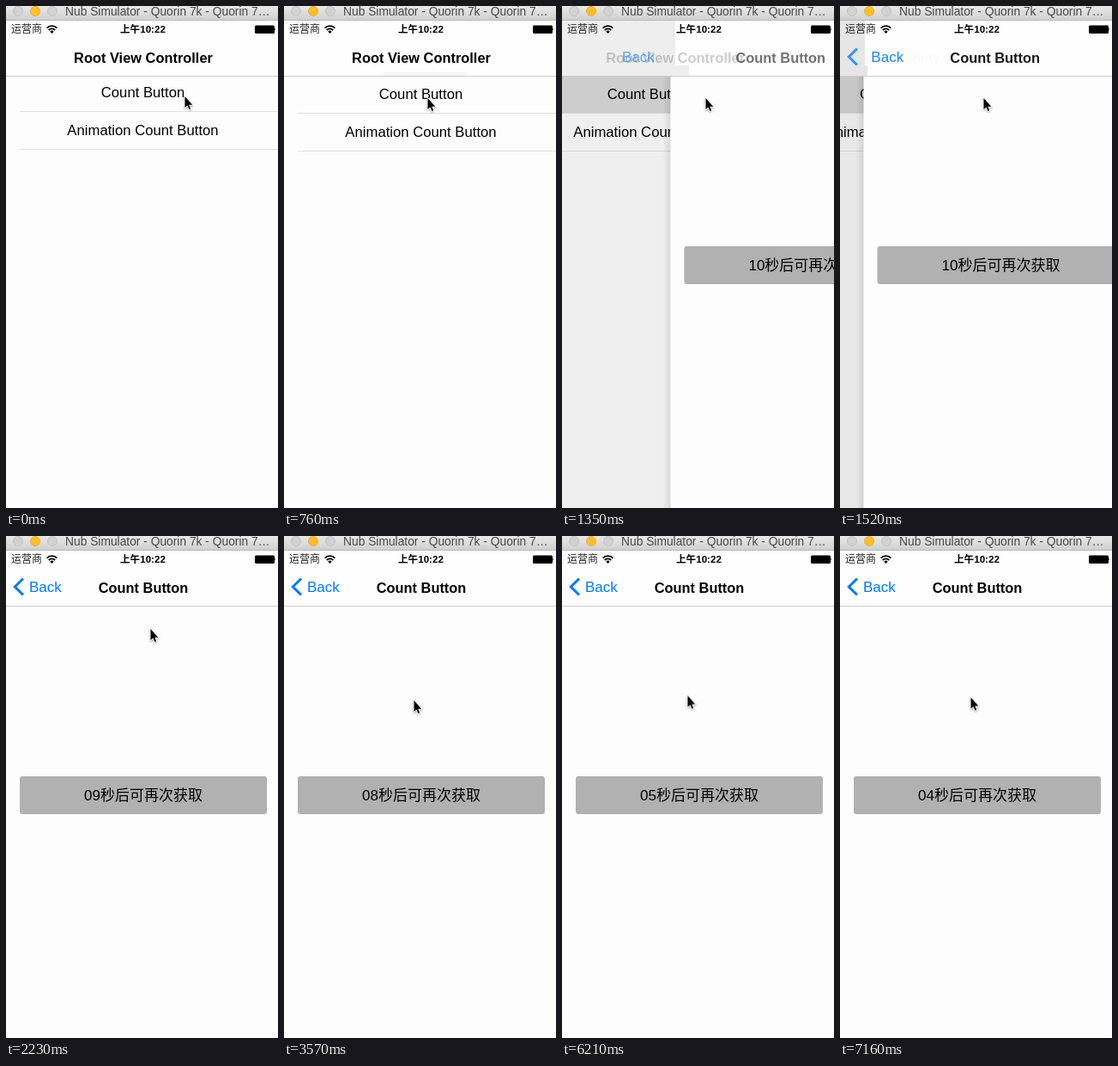
Write an HTML page that moves like this. It is 317 px wide and 583 px high and loops after 8 s.

```html
<!DOCTYPE html>
<html lang="zh">
<head>
<meta charset="utf-8">
<title>Count Button</title>
<style>
@property --p { syntax: "<number>"; inherits: true; initial-value: 0; }
@property --n { syntax: "<integer>"; inherits: true; initial-value: 10; }

html, body { margin: 0; width: 100%; height: 100%; overflow: hidden; background: #fdfdfd; }
body * { position: absolute; box-sizing: border-box; white-space: nowrap; }

/* --p is the progress of the push from the list to the detail page */
#stage {
  inset: 0; width: 317px; height: 583px; overflow: hidden; background: #fdfdfd; color: #000;
  font: 16.7px/20px "Liberation Sans", "Noto Sans CJK SC", "Noto Sans CJK", sans-serif;
  animation: push 8s step-end infinite;
}

.list { top: 0; left: 0; width: 320px; height: 583px; transform: translateX(calc(var(--p) * -96px)); }
.rows { top: 81px; left: 0; width: 320px; animation: settle 8s infinite; }
.row { left: 0; width: 319px; height: 44px; line-height: 43px; text-align: center; }
.row + .row { top: 44px; }
.row::after { content: ""; position: absolute; left: 16px; right: -100px; bottom: 0; height: 1px; background: #e1e1e3; }
.row span { left: 0; width: 100%; }
.tap { inset: 0 -100px 0 0; background: #d9d9d9; animation: tap 8s step-end infinite; }
.dim { inset: 0; background: #000; opacity: calc(var(--p) * .09); }

.detail { top: 0; left: 0; width: 320px; height: 583px; background: #fdfdfd; transform: translateX(calc((1 - var(--p)) * 320px)); }
.detail::before {
  content: ""; position: absolute; left: -9px; width: 9px; height: 100%;
  background: linear-gradient(to left, #00000018, #0000); opacity: calc(var(--p) * 4);
}
.button {
  left: 16px; top: 279px; width: 288px; height: 44px; border-radius: 3px; background: #b1b1b1;
  font-size: 17px; line-height: 46px; text-align: center;
  counter-reset: n var(--n); animation: count 8s step-end infinite;
}
.button::before { content: counter(n, decimal-leading-zero); }

.nav { top: 17px; left: 0; width: 320px; height: 65px; background: #fefefe; border-bottom: 1px solid #cdcdcd; }
.nav div { top: 33px; }
.nav .shade { top: 0; left: 0; width: calc((1 - var(--p)) * 334px); height: 64px; background: #000; opacity: calc(var(--p) * .1); }
.shade::after { content: ""; position: absolute; left: 100%; bottom: 0; width: calc((1 - var(--p)) * 40px); height: 12px; background: #000; }
.nav .smear { left: 116px; top: 60px; width: 97px; height: 4px; background: #f6f6f6; animation: smear 8s step-end infinite; }
.title { left: 0; width: 320px; text-align: center; font-weight: bold; font-size: 16.4px; }
.root { transform: translateX(calc(var(--p) * -46px)); opacity: pow(1 - var(--p), 1.8); }
.count { transform: translateX(calc((1 - var(--p)) * 240px)); opacity: pow(var(--p), 1.2); }
.back { left: 27px; font-size: 17px; color: #007aff; transform: translateX(calc((1 - var(--p)) * 109px)); opacity: var(--p); }
.chevron { left: 0; top: 0; opacity: calc((var(--p) - .62) / .38); }

.carrier { left: 6px; top: 17px; font-size: 12px; color: #222; }
.time { left: 133px; top: 17px; font-size: 11.6px; font-weight: bold; }
.icons { left: 0; top: 0; }

.bar { left: 0; top: 0; width: 317px; height: 17px; background: linear-gradient(#e8e8e8, #d0d0d0); border-bottom: 1px solid #b8b8b8; overflow: hidden; }
.bar i { top: 0; width: 12px; height: 12px; border-radius: 50%; background: #d2d2d2; border: 1px solid #c4c4c4; }
.bar .mid { background: #fdbd30; border-color: #eeb02e; }
.bar span { left: 69px; top: -3px; font-size: 13.8px; color: #484848; }

.cursor { left: 0; top: 0; overflow: visible; filter: drop-shadow(0 1px 1px #0005); animation: cursor 8s step-end infinite; }

@keyframes push {
  0% { --p: 0 }
  16.125% { --p: .272 }
  16.875% { --p: .605 }
  17.625% { --p: .81 }
  18.375% { --p: .914 }
  19.125% { --p: .963 }
  19.875% { --p: .984 }
  20.625% { --p: .993 }
  21.375% { --p: .997 }
  22.125% { --p: .999 }
  23.5%, 100% { --p: 1 }
}
@keyframes settle {
  0%, .75% { transform: translateY(-2px); animation-timing-function: steps(1, jump-both) }
  9.5%, 100% { transform: none }
}
@keyframes tap {
  0% { opacity: 0 }
  15.375%, 100% { opacity: 1 }
}
@keyframes smear {
  0% { opacity: 0 }
  9.5% { opacity: 1 }
  15.375%, 100% { opacity: 0 }
}
@keyframes count {
  0% { --n: 10 }
  27.875% { --n: 9 }
  40.125% { --n: 8 }
  52.125% { --n: 7 }
  64.875% { --n: 6 }
  77.625% { --n: 5 }
  89.5%, 100% { --n: 4 }
}
@keyframes cursor {
  0% { transform: translate(208px, 104px) }
  .75% { transform: translate(208px, 104px); animation-timing-function: steps(9, jump-both) }
  9.5% { transform: translate(167px, 106px) }
  25.625% { transform: translate(168px, 107px) }
  30.875% { transform: translate(168px, 107px); animation-timing-function: steps(12, jump-both) }
  40.125% { transform: translate(152.5px, 188.5px) }
  44.625% { transform: translate(151px, 190px) }
  54.375% { transform: translate(151px, 190px); animation-timing-function: steps(3, jump-both) }
  57.375% { transform: translate(147.5px, 188px) }
  62.625% { transform: translate(147.5px, 188px); animation-timing-function: steps(2, jump-both) }
  65.625% { transform: translate(146.5px, 186px) }
  77.625% { transform: translate(146px, 184.5px); animation-timing-function: steps(5) }
  82.75% { transform: translate(150.5px, 187.5px) }
  88% { transform: translate(150.5px, 187.5px); animation-timing-function: steps(1, jump-both) }
  89.5%, 100% { transform: translate(152px, 186.5px) }
}
</style>
</head>
<body>
<div id="stage">
  <div class="list">
    <div class="rows">
      <div class="row"><b class="tap"></b><span>Count Button</span></div>
      <div class="row"><span>Animation Count Button</span></div>
    </div>
    <div class="dim"></div>
  </div>

  <div class="detail"><div class="button">秒后可再次获取</div></div>

  <div class="nav">
    <div class="shade"></div>
    <div class="smear"></div>
    <div class="title root">Root View Controller</div>
    <div class="title count">Count Button</div>
    <div class="back">Back</div>
    <svg class="chevron" width="30" height="64"><path d="M20 32.5 10.3 42 20 51.5" fill="none" stroke="#007aff" stroke-width="3"/></svg>
  </div>

  <div class="carrier">运营商</div>
  <div class="time">上午10:22</div>
  <svg class="icons" width="317" height="40">
    <path d="M47.6 25.6a8.3 8.3 0 0 1 11.8 0M49.8 28a5.2 5.2 0 0 1 7.4 0" fill="none" stroke="#000" stroke-width="1.8"/>
    <rect x="290" y="22.5" width="23" height="9.5" rx="1.5"/>
    <path d="M51.3 29.7a3.1 3.1 0 0 1 4.4 0L53.5 32zM313.5 25.5q1.5 1.5 0 3z"/>
  </svg>

  <div class="bar">
    <i style="left:8px"></i><i class="mid" style="left:28px"></i><i style="left:48px"></i>
    <span>Nub Simulator - Quorin 7k - Quorin 7…</span>
  </div>

  <svg class="cursor" width="12" height="19">
    <path d="M.5 1V14L3.4 11.4 5.4 16 7.2 15.2 5.3 10.7H9.3Z" stroke="#fff" stroke-width="1.6" paint-order="stroke"/>
  </svg>
</div>
</body>
</html>
```
